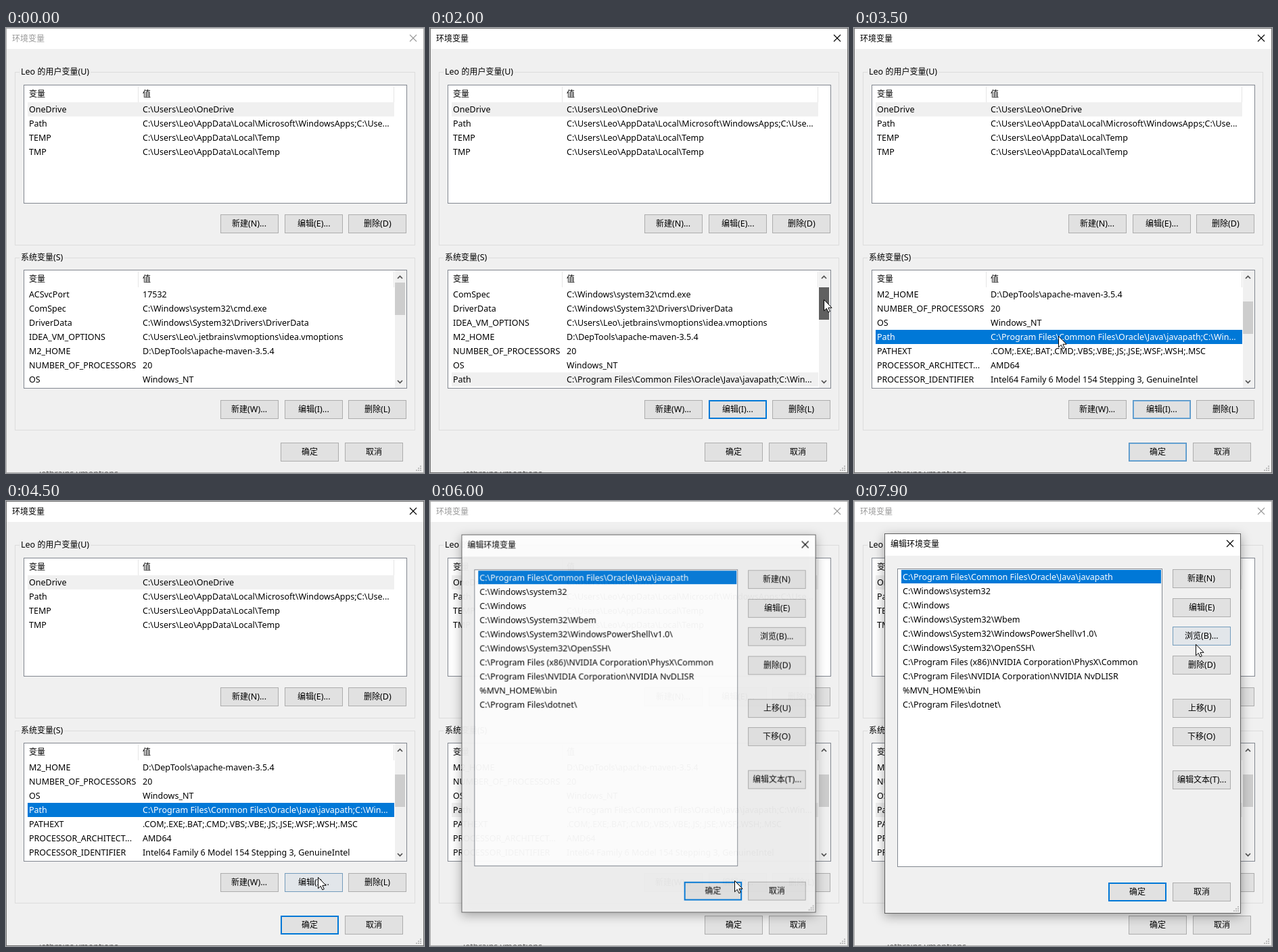
Write an HTML page with a canvas that moves like this. It is 618 px wide and 659 px high and loops after 8 s.

```html
<!DOCTYPE html>
<html lang="zh-CN">
<head>
<meta charset="utf-8">
<title>环境变量</title>
<style>
html, body { margin: 0; width: 100%; height: 100%; overflow: hidden; background: #f0f0f0; }
canvas { display: block; }
</style>
</head>
<body>
<canvas id="stage" width="618" height="659"></canvas>
<script>
const W = 618, H = 659, LOOP = 8000, STEP = 100;
const BLUE = '#0078d7', GREY = '#f0f0f0', FRAME = '#828790';
const LATIN = '12.5px "Noto Sans", "Open Sans", sans-serif';
const HAN = '12px "Noto Sans CJK SC", "Noto Sans CJK", sans-serif';

const stage = document.getElementById('stage').getContext('2d');
const layerCanvas = document.createElement('canvas');
layerCanvas.width = W;
layerCanvas.height = H;
const layer = layerCanvas.getContext('2d');
let g = stage;

const HOME = 'C:\\Users\\Leo\\';
const userVars = [
  ['OneDrive', HOME + 'OneDrive'],
  ['Path', HOME + 'AppData\\Local\\Microsoft\\WindowsApps;C:\\Use...'],
  ['TEMP', HOME + 'AppData\\Local\\Temp'],
  ['TMP', HOME + 'AppData\\Local\\Temp']
];
const systemVars = [
  ['ACSvcPort', '17532'],
  ['ComSpec', 'C:\\Windows\\system32\\cmd.exe'],
  ['DriverData', 'C:\\Windows\\System32\\Drivers\\DriverData'],
  ['IDEA_VM_OPTIONS', HOME + '.jetbrains\\vmoptions\\idea.vmoptions'],
  ['M2_HOME', 'D:\\DepTools\\apache-maven-3.5.4'],
  ['NUMBER_OF_PROCESSORS', '20'],
  ['OS', 'Windows_NT'],
  ['Path', 'C:\\Program Files\\Common Files\\Oracle\\Java\\javapath;C:\\Win...'],
  ['PATHEXT', '.COM;.EXE;.BAT;.CMD;.VBS;.VBE;.JS;.JSE;.WSF;.WSH;.MSC'],
  ['PROCESSOR_ARCHITECT...', 'AMD64'],
  ['PROCESSOR_IDENTIFIER', 'Intel64 Family 6 Model 154 Stepping 3, GenuineIntel']
];
const PATH_ROW = 7;
const pathEntries = [
  'C:\\Program Files\\Common Files\\Oracle\\Java\\javapath',
  'C:\\Windows\\system32',
  'C:\\Windows',
  'C:\\Windows\\System32\\Wbem',
  'C:\\Windows\\System32\\WindowsPowerShell\\v1.0\\',
  'C:\\Windows\\System32\\OpenSSH\\',
  'C:\\Program Files (x86)\\NVIDIA Corporation\\PhysX\\Common',
  'C:\\Program Files\\NVIDIA Corporation\\NVIDIA NvDLISR',
  '%MVN_HOME%\\bin',
  'C:\\Program Files\\dotnet\\'
];

// [time, x, y, eased]
const pointerKeys = [
  [300, 565, 198], [400, 566, 282], [500, 566, 314], [600, 566, 314],
  [900, 567, 372], [1000, 571, 392], [1200, 583, 395], [1600, 583, 395],
  [2000, 582, 402], [2500, 584, 420], [2700, 584, 423], [2800, 584, 423],
  [3300, 302, 456, 1], [3700, 302, 456], [3800, 306, 454], [3900, 314, 462],
  [4000, 314, 462], [4100, 322, 466], [4300, 400, 512], [4400, 440, 543],
  [4500, 461, 557], [4700, 462, 566], [4900, 451, 564], [5000, 450, 563],
  [5100, 450, 563], [5200, 450, 562], [6200, 450, 562], [6900, 345, 111, 1],
  [7200, 345, 111], [7900, 505, 212, 1]
];
const thumbKeys = [[1600, 377, 0], [2000, 384, 0], [2500, 402, 0], [2700, 405, 0]];

const clamp = v => Math.max(0, Math.min(1, v));
const ramp = (t, from, span) => clamp((t - from) / span);
const during = (t, from, to) => t >= from && t < to;

function track(keys, t) {
  const n = keys.findIndex(k => k[0] > t);
  if (n < 0) return keys[keys.length - 1].slice(1);
  if (n === 0) return keys[0].slice(1);
  const a = keys[n - 1], b = keys[n];
  let p = (t - a[0]) / (b[0] - a[0]);
  if (b[3]) p = p * p * (3 - 2 * p);
  return [1, 2].map(i => Math.round(a[i] + (b[i] - a[i]) * p));
}

function rect(x, y, w, h, color) {
  g.fillStyle = color;
  g.fillRect(x, y, w, h);
}

// Fill and border do not overlap, so the box can be drawn translucent.
function box(x, y, w, h, fill, border, width = 1) {
  rect(x + width, y + width, w - 2 * width, h - 2 * width, fill);
  g.strokeStyle = border;
  g.lineWidth = width;
  g.strokeRect(x + width / 2, y + width / 2, w - width, h - width);
}

function line(points, color, width) {
  g.beginPath();
  points.forEach(([x, y], i) => i ? g.lineTo(x, y) : g.moveTo(x, y));
  g.strokeStyle = color;
  g.lineWidth = width;
  g.stroke();
}

const runs = s => s.match(/[\u4e00-\u9fff]+|[^\u4e00-\u9fff]+/g);
const fontOf = run => run.charCodeAt(0) >= 0x4e00 ? HAN : LATIN;

function textWidth(s) {
  return runs(s).reduce((sum, run) => {
    g.font = fontOf(run);
    return sum + g.measureText(run).width;
  }, 0);
}

function text(s, x, y, color = '#000') {
  for (const run of runs(s)) {
    g.font = fontOf(run);
    g.fillStyle = color;
    g.fillText(run, x, y);
    x += g.measureText(run).width;
  }
}

function withAlpha(a, draw) {
  if (a <= 0) return;
  g.save();
  g.globalAlpha = a;
  draw();
  g.restore();
}

function button(x, y, label, { ring = 0, hover = 0, press = false } = {}) {
  box(x, y, 86, 28, '#e1e1e1', '#adadad');
  withAlpha(ring, () => box(x, y, 86, 28, '#e1e1e1', BLUE, 2));
  withAlpha(hover, () => box(x, y, 86, 28, '#e5f1fb', BLUE));
  if (press) box(x, y, 86, 28, '#cce4f7', '#005499');
  text(label, Math.round(x + 43 - textWidth(label) / 2), y + 18);
}

function cross(x, y, color) {
  line([[x - 5, y - 5], [x + 5, y + 5]], color, 1.1);
  line([[x + 5, y - 5], [x - 5, y + 5]], color, 1.1);
}

function grip(x, y) {
  for (let r = 0; r < 3; r++)
    for (let c = 2 - r; c < 3; c++) rect(x + c * 3, y + r * 3, 2, 2, '#bdbdbd');
}

function group(y, h, label) {
  box(13, y, 592, h, GREY, '#dcdcdc');
  rect(20, y, textWidth(label) + 4, 1, GREY);
  text(label, 22, y + 4);
}

function table(y, headY, rowY, rows, first, marked, focused) {
  box(26, y, 567, 176, '#fff', FRAME);
  text('变量', 34, headY);
  text('值', 202, headY);
  rect(195, y + 2, 1, rowY - y - 2, '#e5e5e5');
  rect(573, y + 2, 1, rowY - y - 2, '#e5e5e5');
  rows.slice(first, first + 7).forEach(([name, value], i) => {
    const top = rowY + i * 21, on = first + i === marked;
    if (on) rect(32, top, 542, 21, focused ? BLUE : GREY);
    const color = on && focused ? '#fff' : '#000';
    text(name, 34, top + 15, color);
    text(value, 202, top + 15, color);
  });
}

function scrollbar(thumbY, color) {
  rect(575, 359, 17, 174, GREY);
  rect(575, thumbY, 15, 48, color);
  line([[579, 371], [582.5, 367.5], [586, 371]], '#505050', 1.7);
  line([[579, 522], [582.5, 525.5], [586, 522]], '#505050', 1.7);
}

function mainWindow(t) {
  const active = during(t, 1300, 5800);
  box(0, 0, W, H, GREY, active ? '#707070' : '#aaa');
  rect(1, 1, W - 2, 30, '#fff');
  const ink = active ? '#000' : '#999';
  text('环境变量', 9, 20, ink);
  cross(602, 15, ink);

  group(65, 257, 'Leo 的用户变量(U)');
  table(84, 102, 110, userVars, 0, 0, false);
  button(317, 276, '新建(N)...');
  button(412, 276, '编辑(E)...');
  button(506, 276, '删除(D)', { hover: during(t, 400, 500) ? 0.35 : 0 });

  const thumbY = track(thumbKeys, t)[0];
  const selected = during(t, 3500, 5700);
  group(340, 256, '系统变量(S)');
  table(358, 376, 384, systemVars, Math.round((thumbY - 377) / 6.9), PATH_ROW, selected);
  const dragging = during(t, 1300, 2700);
  const over = during(t, 1200, 1300) || during(t, 2700, 2900);
  scrollbar(thumbY, dragging ? '#606060' : over ? '#a6a6a6' : '#cdcdcd');

  button(317, 551, '新建(W)...');
  button(412, 551, '编辑(I)...', {
    ring: t < 3500 ? ramp(t, 1200, 300) : t < 3600 ? 0.5 : 0,
    hover: during(t, 4400, 5700) ? ramp(t, 4400, 300) : 0,
    press: during(t, 5700, 5800)
  });
  button(506, 551, '删除(L)');
  button(406, 614, '确定', { ring: selected ? ramp(t, 3400, 200) : 0 });
  button(501, 614, '取消');
  grip(606, 648);

  // sliver of text behind the lower edge
  g.save();
  g.beginPath();
  g.rect(0, 656, W, 3);
  g.clip();
  text('jetbrains.vmoptions', 49, 664, '#666');
  g.restore();
}

function editDialog(t) {
  box(45, 48, 527, 563, GREY, '#606060');
  rect(46, 49, 525, 32, '#fff');
  text('编辑环境变量', 54, 68);
  cross(556, 63, '#000');
  box(64, 100, 392, 442, '#fff', FRAME);
  rect(70, 102, 384, 20, BLUE);
  pathEntries.forEach((s, i) => text(s, 72, 117 + i * 21, i ? '#000' : '#fff'));
  const side = [
    [101, '新建(N)'], [144, '编辑(E)'], [186, '浏览(B)...'], [229, '删除(D)'],
    [293, '上移(U)'], [335, '下移(O)'], [399, '编辑文本(T)...'], [565, '取消']
  ];
  for (const [y, label] of side)
    button(471, y, label, { hover: y === 186 ? ramp(t, 7800, 300) : 0 });
  button(376, 565, '确定', { ring: 1 });
  grip(561, 600);
}

function showDialog(t) {
  if (t < 5900) return;
  g = layer;
  g.clearRect(0, 0, W, H);
  editDialog(t);
  g = stage;
  const [alpha, scale] = t < 6000 ? [0.5, 0.97] : t < 6100 ? [0.95, 0.9945] : [1, 1];
  g.save();
  g.globalAlpha = alpha;
  g.translate(308.5, 329.5);
  g.scale(scale, scale);
  g.translate(-308.5, -329.5);
  g.shadowColor = 'rgba(0,0,0,0.34)';
  g.shadowBlur = 16;
  g.shadowOffsetY = 4;
  g.drawImage(layerCanvas, 0, 0);
  g.restore();
}

function arrow(x, y) {
  const shape = [[0, 0], [0, 16.5], [3.8, 13], [6.3, 18.5], [8.8, 17.4], [6.4, 12], [11.6, 12]];
  g.beginPath();
  shape.forEach(([dx, dy]) => g.lineTo(x + 0.5 + dx, y + 0.3 + dy));
  g.closePath();
  g.fillStyle = '#fff';
  g.fill();
  g.strokeStyle = '#000';
  g.lineWidth = 1;
  g.stroke();
}

function columnCursor(x, y) {
  rect(x - 1, y - 8, 2, 17, '#000');
  for (const d of [-1, 1]) {
    line([[x, y], [x + d * 8, y]], '#000', 1);
    line([[x + d * 5, y - 3], [x + d * 8, y], [x + d * 5, y + 3]], '#000', 1);
  }
}

function pointer(t) {
  if (t < 300) return;
  const [x, y] = track(pointerKeys, t);
  (during(t, 900, 1000) ? columnCursor : arrow)(x, y);
}

function draw(time) {
  const t = Math.floor(time / STEP) * STEP;
  mainWindow(t);
  showDialog(t);
  pointer(t);
}

const start = performance.now();
function tick() {
  draw((performance.now() - start) % LOOP);
  requestAnimationFrame(tick);
}
tick();
</script>
</body>
</html>
```
